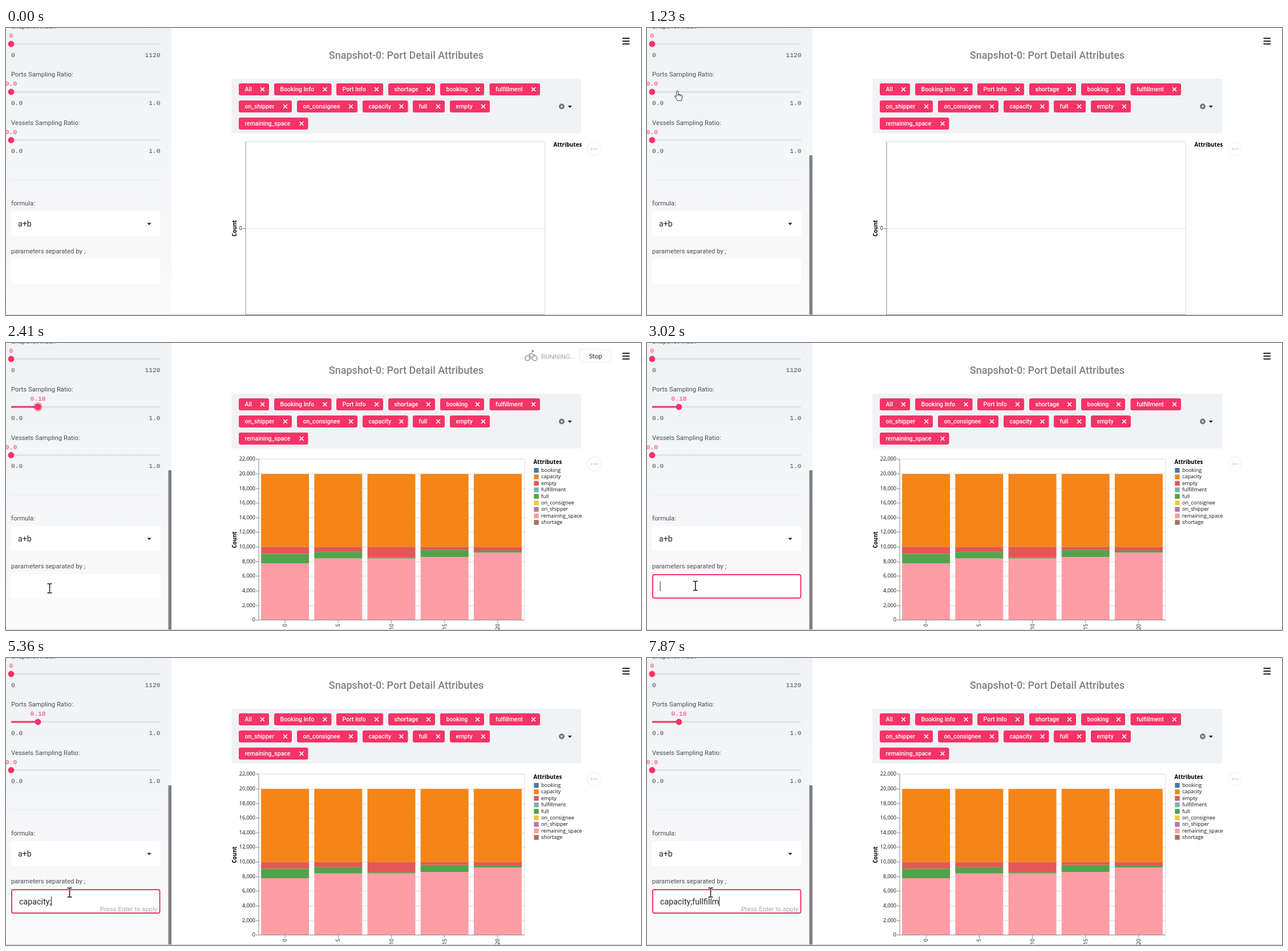
Animation of 1113x503 px, one loop 8 s. Source, as an HTML page:

```html
<!DOCTYPE html>
<html lang="en">
<head>
<meta charset="utf-8">
<title>Port Detail Attributes</title>
<style>
  html, body { margin: 0; width: 100%; height: 100%; overflow: hidden; background: #fff; }
  svg { display: block; width: 1113px; height: 503px; font-family: Roboto, sans-serif; font-size: 11.3px; fill: #262730; }
  .label { fill: #4b4d56; }
  .mono { font-family: "Liberation Mono", monospace; fill: #4b4d56; }
  .value { fill: #f63366; text-anchor: middle; }
  .end { text-anchor: end; }
  .mid { text-anchor: middle; }
  .big { font-size: 14.25px; }
  .title { font-size: 18px; font-weight: 500; fill: #808080; text-anchor: middle; }
  .tag { font-size: 10.5px; font-weight: 500; fill: #fff; }
  .chart { font-family: "Open Sans", sans-serif; font-size: 9.1px; fill: #111; }
  .bold { font-weight: 700; font-size: 9.7px; fill: #000; }
  .line { fill: none; }
</style>
</head>
<body>
<svg id="stage" viewBox="0 0 1113 503"></svg>
<script>
const LOOP = 8000;
const PINK = '#f63366';

const rect = (x, y, w, h, fill, extra = '') =>
  `<rect x="${x}" y="${y}" width="${w}" height="${h}" fill="${fill}" ${extra}/>`;
const text = (x, y, str, cls = '', extra = '') =>
  `<text x="${x}" y="${y}" class="${cls}" ${extra}>${str}</text>`;
const path = (d, stroke, width = 1, extra = '') =>
  `<path class="line" d="${d}" stroke="${stroke}" stroke-width="${width}" ${extra}/>`;
const group = (id, body, extra = '') => `<g id="${id}" ${extra}>${body}</g>`;
const cross = (x, y, r, color, width) =>
  path(`M${x - r} ${y - r}l${2 * r} ${2 * r}m0 ${-2 * r}l${-2 * r} ${2 * r}`, color, width);
const caretDown = (x, y) => `<path d="M${x - 3.7} ${y - 2}h7.4l-3.7 4z"/>`;

function slider(id, y, label, min, max, value) {
  return text(9, y - 27, label, 'label') +
    rect(9, y - 1.5, 261, 3, '#dfe2e8', 'rx="1.5"') +
    rect(9, y - 1.5, 0, 3, PINK, `id="${id}Fill"`) +
    `<circle id="${id}Halo" cy="${y}" r="8" fill="${PINK}" opacity=".45" visibility="hidden"/>` +
    `<circle id="${id}Thumb" cx="9" cy="${y}" r="5.4" fill="${PINK}"/>` +
    text(9, y - 11, value, 'mono value', `id="${id}Value"`) +
    text(9, y + 22.5, min, 'mono') + text(270.5, y + 22.5, max, 'mono end');
}

function sidebar() {
  return rect(0, 0, 290, 503, 'url(#side)') +
    slider('index', 28, 'Snapshot Index', '0', '1120', '0') +
    slider('ports', 112, 'Ports Sampling Ratio:', '0.0', '1.0', '0.0') +
    slider('vessels', 196.5, 'Vessels Sampling Ratio:', '0.0', '1.0', '0.0') +
    rect(9, 265.5, 261, 1, '#e9ebef') +
    text(9, 311, 'formula:', 'label') +
    rect(9, 321, 261.5, 43, '#fff', 'rx="3"') +
    text(21, 348, 'a+b', 'big') + caretDown(251, 343.5) +
    text(9, 395, 'parameters separated by ;', 'label') +
    rect(9, 405, 261.5, 43, '#fff', 'rx="3"') +
    group('focus', rect(10, 406, 259.5, 41, 'none', `rx="3" stroke="${PINK}" stroke-width="2"`)) +
    text(23, 432, '', 'big', 'id="typed"') +
    rect(23, 418, 1, 17, '#262730', 'id="caret"') +
    group('hint', text(265, 443.5, 'Press Enter to apply', 'end', 'style="fill:#a3a8b4"')) +
    group('scrollbar', rect(284.5, 223, 5.5, 285, '#7f7f7f', 'rx="1"'));
}

// Each row holds [label, left, right].
const TAG_ROWS = [
  [['All', 408, 461], ['Booking Info', 470, 570.5], ['Port Info', 579, 661],
    ['shortage', 670, 752], ['booking', 761, 838], ['fulfillment', 847.5, 936]],
  [['on_shipper', 408, 501], ['on_consignee', 510, 616], ['capacity', 625, 704.5],
    ['full', 713, 769], ['empty', 778, 848]],
  [['remaining_space', 408, 529.5]]
];

function header() {
  const tags = TAG_ROWS.map((row, i) => row.map(([label, left, right]) => {
    const y = 97 + 30 * i;
    return rect(left, y, right - left, 21, PINK, 'rx="3"') +
      text(left + 10.5, y + 14.3, label, 'tag') +
      cross(right - 11.5, y + 10.5, 3.4, '#fff', 1.5);
  }).join('')).join('');
  return text(701.5, 53.5, 'Snapshot-0: Port Detail Attributes', 'title') +
    path('M1080.5 18h12.5m-12.5 5h12.5m-12.5 5h12.5', '#262730', 1.8) +
    rect(395, 89, 613, 96, '#f0f2f6', 'rx="3"') + tags +
    '<circle cx="974" cy="137.5" r="4.9" fill="#75777f"/>' +
    cross(974, 137.5, 1.7, '#f0f2f6', 1.1) + caretDown(988.3, 138) +
    rect(0, 502, 1113, 1, '#d2d2d2');
}

const countTitle = y => text(0, 0, 'Count', 'bold mid', `transform="translate(403.5 ${y}) rotate(-90)"`);

function emptyChart() {
  return path('M420 199.5H944.5V503M420 351.5H944', '#ddd') +
    path('M420 199.5V503M415 351.5h5', '#888') + path('M420 502.5H944.5', '#888') +
    text(414, 354.3, '0', 'chart end') +
    `<g class="chart">${countTitle(351)}${text(959.5, 207.5, 'Attributes', 'bold')}</g>`;
}

const LEGEND = [
  ['booking', '#4c78a8'], ['capacity', '#f58518'], ['empty', '#e45756'],
  ['fulfillment', '#72b7b2'], ['full', '#54a24b'], ['on_consignee', '#eeca3b'],
  ['on_shipper', '#b279a2'], ['remaining_space', '#ff9da6'], ['shortage', '#9d755d']
];
const COLOR = Object.fromEntries(LEGEND);
// Upper edges of "full" and "remaining_space" in thousands, one pair per bar.
const STACKS = [[9.08, 7.78], [9.33, 8.43], [8.58, 8.43], [9.6, 8.63], [9.5, 9.22]];

function barChart() {
  const yOf = k => 485.7 - k * 12.81;
  let out = '', axis = '';
  for (let k = 0; k <= 22; k += 2) {
    const y = Math.floor(yOf(k)) + .5;
    out += path(`M443 ${y}H909`, '#ddd');
    axis += path(`M438 ${y}h5`, '#888') +
      text(437, y + 2.8, k ? `${k},000` : '0', 'end');
  }
  out += path('M909 204V486', '#ddd');
  STACKS.forEach(([full, rest], i) => {
    const x = 447.1 + 93.2 * i;
    const edges = [[20, 10, 'capacity'], [10, full, 'empty'], [full, rest, 'full'], [rest, 0, 'remaining_space']];
    for (const [top, low, name] of edges)
      out += rect(x, yOf(top), 84, yOf(low) - yOf(top), COLOR[name]);
    const mid = x + 42;
    axis += path(`M${mid} 486v4.5`, '#888') +
      text(0, 0, 5 * i, 'end', `transform="translate(${mid + 3} 492) rotate(-90)"`);
  });
  out += path('M443 204V485.5H909', '#888') + axis;
  LEGEND.forEach(([name, color], i) => {
    const y = 223 + 11.4 * i;
    out += rect(925.3, y - 4, 8.4, 8.4, color) + text(938, y + 3, name);
  });
  return `<g class="chart">${out}${countTitle(345)}${text(924.5, 211.7, 'Attributes', 'bold')}</g>`;
}

function status() {
  const bike = '<circle cx="914" cy="26.7" r="4.1"/><circle cx="926.8" cy="26.7" r="4.1"/>' +
    '<path d="M920.3 28.5v-4.3l-3.6-3.2 4-3.5 3 3h3.4"/>';
  return `<g fill="none" stroke="#8c8f99" stroke-width="1.5" stroke-linejoin="round">${bike}</g>` +
    '<circle cx="923.3" cy="13.9" r="2" fill="#8c8f99"/>' +
    text(938, 27.7, 'RUNNING...', '', 'style="font-size:11.7px;fill:#a3a8b4"') +
    rect(1005.5, 11, 55.5, 22.5, '#fff', 'rx="3" stroke="#e6eaf1"') +
    text(1033.2, 26.7, 'Stop', 'mid');
}

const menuDots = '<circle cx="1030.7" cy="212" r="12" fill="#fff" stroke="#aaa"/>' +
  [-4.5, 0, 4.5].map(d => `<circle cx="${1030.7 + d}" cy="212" r="1.6" fill="#333"/>`).join('');

const pointers =
  group('arrow', '<path d="M0 0V14.5L3.4 11.3 5.7 16.6 8 15.6 5.7 10.5H10.3Z" fill="#fff" stroke="#111" stroke-width=".9"/>') +
  group('hand', '<path d="M-1.5 1.5Q0-.8 1.5 1.5V7Q2.8 6 3.8 7.3 5 6.5 6 7.8 7.8 7.2 8.2 9V13Q8 15 7 17.6H0Q-1 14.5-4.8 11-5 8.8-2.8 9.8L-1.5 11ZM1.5 7V9.5M3.8 7.3V9.7M6 7.8V10" fill="#fff" stroke="#222" stroke-width=".95" stroke-linejoin="round"/>') +
  group('beam', path('M-4-8H-1.2L0-7.2 1.2-8H4M0-7.2V7.2M-4 8H-1.2L0 7.2 1.2 8H4', '#fff', 3) +
    path('M-4-8H-1.2L0-7.2 1.2-8H4M0-7.2V7.2M-4 8H-1.2L0 7.2 1.2 8H4', '#111', 1.5));

const stage = document.getElementById('stage');
stage.innerHTML =
  '<defs><linearGradient id="side" x2="0" y2="1"><stop stop-color="#f0f2f6"/>' +
  '<stop offset="1" stop-color="#fafafa"/></linearGradient></defs>' +
  rect(0, 0, 1113, 503, '#fff') + sidebar() + header() +
  group('emptyChart', emptyChart()) + group('barChart', barChart()) +
  group('menu', menuDots) + group('status', status()) + group('pointer', pointers);

const el = Object.fromEntries([...stage.querySelectorAll('[id]')].map(n => [n.id, n]));
const show = (node, on) => node.setAttribute('visibility', on ? 'visible' : 'hidden');
const set = (node, attrs) => Object.entries(attrs).forEach(([k, v]) => node.setAttribute(k, v));

const PHRASE = 'capacity;fullfillm';
const KEY_TIMES = [3570, 3720, 3890, 4030, 4490, 4640, 4810, 4880, 5360, 5610,
  5990, 6450, 6620, 6870, 6940, 7170, 7640, 7870];

// [time, x, y]
const ROUTE = [
  [380, 640, 490], [780, 300, 300], [1160, 55, 123], [1230, 53.3, 109.5], [1780, 53.3, 109.5],
  [2240, 76.5, 430], [2950, 76.5, 430], [3250, 111.5, 411]
];

function pointerAt(t) {
  const next = ROUTE.findIndex(p => p[0] > t);
  if (next < 0) return ROUTE[ROUTE.length - 1].slice(1);
  if (next === 0) return ROUTE[0].slice(1);
  const [t0, x0, y0] = ROUTE[next - 1], [t1, x1, y1] = ROUTE[next];
  const u = (t - t0) / (t1 - t0);
  return [x0 + (x1 - x0) * u, y0 + (y1 - y0) * u];
}

function draw(t) {
  const [x, y] = pointerAt(t);
  const visible = t >= 380, inSidebar = visible && x < 290;
  const shape = !inSidebar ? 'arrow' : y < 122 ? 'hand' : y > 382 ? 'beam' : 'arrow';
  set(el.pointer, { transform: `translate(${x} ${y})` });
  for (const name of ['arrow', 'hand', 'beam']) show(el[name], visible && name === shape);
  show(el.scrollbar, inSidebar);
  set(el.menu, { opacity: visible && x > 395 ? 1 : .2 });

  const ratio = t >= 1550 ? .18 : 0;
  const thumbX = 9 + 261 * ratio;
  set(el.portsFill, { width: thumbX - 9 });
  set(el.portsThumb, { cx: thumbX });
  set(el.portsHalo, { cx: thumbX });
  set(el.portsValue, { x: thumbX });
  el.portsValue.textContent = ratio ? ratio.toFixed(2) : '0.0';
  show(el.portsHalo, t >= 1550 && t < 2710);

  show(el.status, t >= 1860 && t < 2560);
  show(el.emptyChart, t < 2410);
  show(el.barChart, t >= 2410);

  const count = KEY_TIMES.filter(k => k <= t).length;
  el.typed.textContent = PHRASE.slice(0, count);
  set(el.caret, { x: 22.6 + (count ? el.typed.getComputedTextLength() : 0) });
  show(el.focus, t >= 2710);
  show(el.caret, t >= 2710);
  show(el.hint, count > 0);
}

const start = performance.now();
function tick() {
  draw((performance.now() - start) % LOOP);
  requestAnimationFrame(tick);
}
tick();
</script>
</body>
</html>
```
